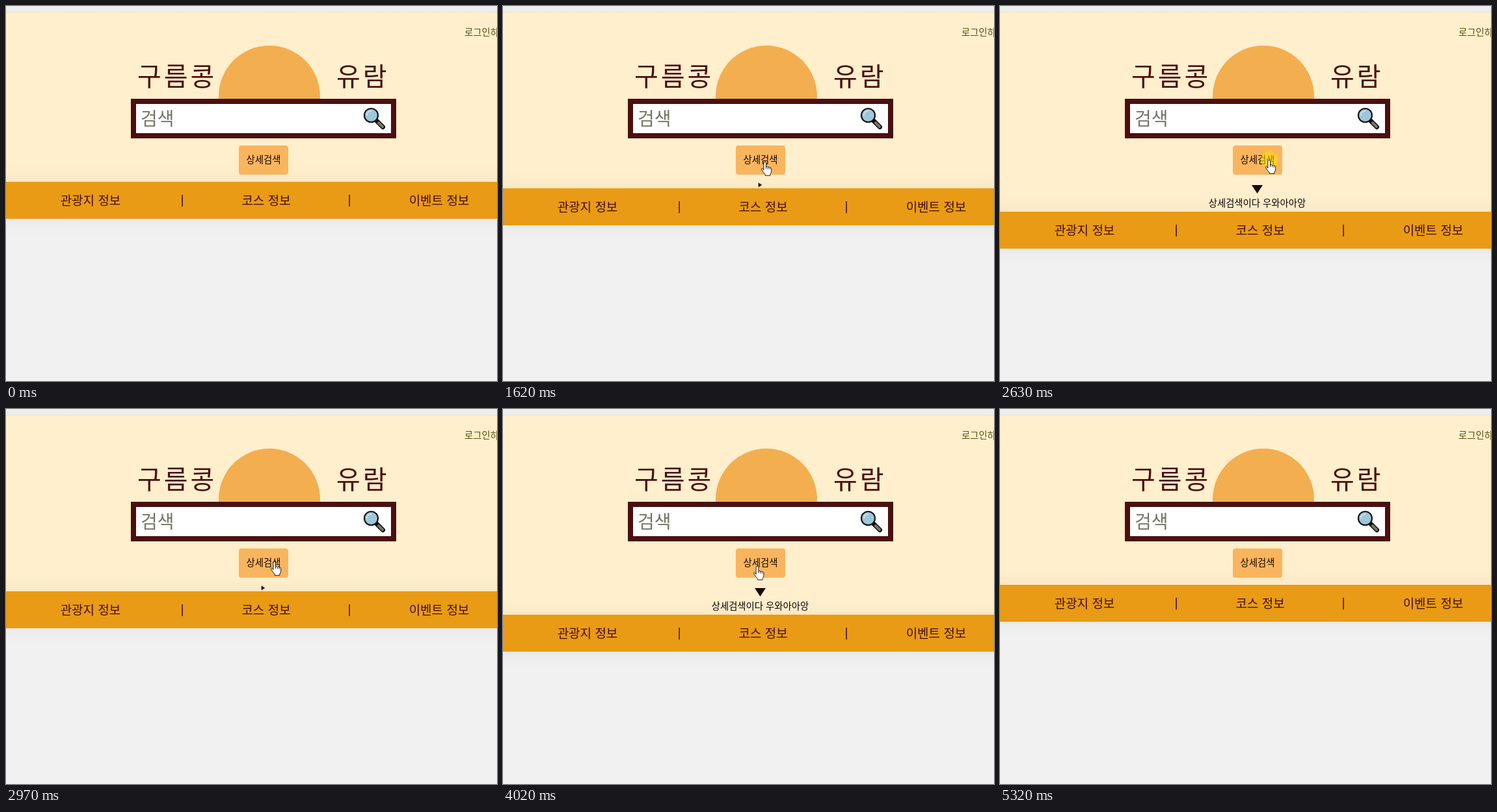
An HTML page for the animation above (5.59 s loop, 755 px wide and 578 px high).

```html
<!DOCTYPE html>
<html lang="ko">
<head>
<meta charset="utf-8">
<title>구름콩 유람</title>
<style>
  html, body { margin: 0; width: 100%; height: 100%; overflow: hidden; }
  body {
    position: relative; background: #f1f1f1; color: #100404;
    font: 14.4px/1 "Noto Sans CJK KR", "Noto Sans CJK", sans-serif;
  }
  body > * { position: absolute; }
  .strip { left: 0; right: 0; top: 0; height: 9px; background: linear-gradient(#efefef, #ededed); border-bottom: 1px solid #ebe4d3; }
  .header { left: 0; right: 0; top: 10px; height: 261px; background: #ffefcc; }
  .login { left: 705px; top: 33px; white-space: nowrap; color: #55500f; }
  .title { top: 86px; font-size: 40px; font-weight: 500; letter-spacing: 4px; color: #4c0f0f; white-space: nowrap; }
  .emblem { left: 327px; top: 61px; width: 156px; height: 82px; overflow: hidden; }
  .emblem::before { content: ""; display: block; height: 156px; border-radius: 50%; background: #f3ae4f; }
  .search {
    box-sizing: border-box; left: 192px; top: 143px; width: 408px; height: 61px;
    padding-left: 7px; border: 8px solid #4c0f0f; background: #fff;
    font-size: 28px; line-height: 42px; color: #757567;
  }
  .lens { left: 548px; top: 155px; }
  .button {
    left: 358px; top: 215px; width: 76px; height: 45px; z-index: 1;
    border-radius: 4px; background: #f9b55e; text-align: center; line-height: 42px;
  }

  /* The panel grows with the marker and the tip, and pushes the menu down. */
  .panel { left: 0; right: 0; top: 271px; }
  .marker, .tip { background: #ffefcc; text-align: center; overflow: hidden; }
  .marker { height: 0; animation: grow 5.59s ease infinite; }
  .marker svg { display: block; width: 23px; height: 100%; margin-left: 384px; animation: turn 5.59s ease infinite; }
  .tip { height: 0; line-height: 18px; padding-left: 36px; animation: tip 5.59s step-end infinite; }
  .menu {
    position: relative; height: 57px; margin: 0 -60px; background: #e99b15;
    box-shadow: 0 0 34px rgba(0, 0, 0, .055); font-size: 19px; color: #430d0d;
  }
  .menu span { position: absolute; top: 27px; transform: translate(-50%, -50%); white-space: nowrap; }
  .menu .bar { font-size: 16px; font-weight: 700; }

  .cursor { left: 0; top: 0; z-index: 2; width: 0; height: 0; animation: move 5.59s linear infinite; }
  .cursor > * { position: absolute; }
  .press {
    left: -13px; top: -13px; width: 26px; height: 26px; border-radius: 50%;
    background: rgba(255, 228, 0, .58); animation: press 5.59s step-end infinite;
  }
  .hand { left: -7px; top: -1px; animation: hand 5.59s step-end infinite; }
  .arrow { left: 0; top: 0; animation: arrow 5.59s step-end infinite; }

  @keyframes grow {
    0%, 11.807%, 32.558%, 37.925%, 56.708%, 66.726%, 87.478%, 100% { height: 0; }
    17.174%, 27.191%, 43.292%, 51.342%, 72.093%, 82.111% { height: 23px; }
  }
  @keyframes turn {
    0%, 11.807%, 37.925%, 66.726% { transform: rotate(316deg); }
    17.174%, 27.191%, 43.292%, 51.342%, 72.093%, 82.111% { transform: rotate(0deg); }
    32.558%, 56.708%, 87.478%, 100% { transform: rotate(-158deg); }
  }
  @keyframes tip {
    0%, 27.191%, 51.342%, 82.111%, 100% { height: 0; }
    11.807%, 37.925%, 66.726% { height: 23px; }
  }
  @keyframes press {
    0%, 11.807%, 27.191%, 37.925%, 51.342%, 66.726%, 82.111%, 100% { opacity: 0; }
    9.66%, 22.89%, 35.05%, 47.04%, 64.21%, 77.81% { opacity: 1; }
  }
  @keyframes hand {
    0%, 85.868%, 100% { opacity: 0; }
    9.302% { opacity: 1; }
  }
  @keyframes arrow {
    0%, 9.302%, 95.15%, 100% { opacity: 0; }
    1.25%, 85.868% { opacity: 1; }
  }
  @keyframes move {
    0%, 1.252% { transform: translate(529px, 373px); }
    4.472% { transform: translate(420px, 325px); }
    7.156% { transform: translate(318px, 270px); }
    9.302% { transform: translate(398px, 239px); }
    10.733%, 14.49% { transform: translate(406px, 236px); }
    18.068%, 32.558% { transform: translate(403px, 240px); }
    35.063% { transform: translate(411px, 238px); }
    43.292%, 47.048% { transform: translate(414px, 237px); }
    51.342%, 58.14% { transform: translate(413px, 235px); }
    60.823% { transform: translate(391px, 247px); }
    64.222%, 66.726% { transform: translate(400px, 239px); }
    72.093%, 83.9% { transform: translate(391px, 242px); }
    85.152% { transform: translate(393px, 246px); }
    86.404% { transform: translate(450px, 304px); }
    87.657% { transform: translate(557px, 392px); }
    93.918%, 100% { transform: translate(714px, 559px); }
  }
</style>
</head>
<body>
  <div class="strip"></div>
  <div class="header"></div>
  <div class="login">로그인하기</div>
  <div class="title" style="left:202px">구름콩</div>
  <div class="emblem"></div>
  <div class="title" style="left:508px">유람</div>
  <div class="search">검색</div>
  <svg class="lens" width="37" height="37" stroke-linecap="round">
    <path d="M22 22L31.500 31.500" stroke="#0c0c0c" stroke-width="7"/>
    <path d="M25 25L31 31" stroke="#727a66" stroke-width="4"/>
    <circle cx="13.500" cy="13.500" r="10.500" fill="#9fc6da" stroke="#161616" stroke-width="2.200"/>
    <path d="M7 13a7 7 0 0 1 6-6" fill="none" stroke="#c4dfea" stroke-width="2"/>
  </svg>
  <div class="button">상세검색</div>

  <div class="panel">
    <div class="marker"><svg viewBox="0 0 23 23"><path d="M3 5H20L11.5 18Z" fill="#1c0808"/></svg></div>
    <div class="tip">상세검색이다 우와아아앙</div>
    <div class="menu">
      <span style="left:190px">관광지 정보</span>
      <span class="bar" style="left:331px">|</span>
      <span style="left:460px">코스 정보</span>
      <span class="bar" style="left:588px">|</span>
      <span style="left:726px">이벤트 정보</span>
    </div>
  </div>

  <div class="cursor">
    <div class="press"></div>
    <svg class="hand" width="18" height="24" viewBox="0 0 20 26" fill="#fff" stroke="#000" stroke-linejoin="round">
      <path d="M5.5 15V3a2 2 0 0 1 4 0v6.5q2-1.2 3.2.6 2-1 3 .8 2.300-.6 2.800 1.600V17q0 3-2 5v2.500H8V22.500Q5 19.500 2 14.500 1 12.500 2.500 12 4 12 5.500 15Z"/>
      <path d="M9.500 9.500V13M12.700 10.500V13.500M15.700 11.500V14" fill="none"/>
    </svg>
    <svg class="arrow" width="13" height="20" fill="#fff" stroke="#000">
      <path d="M.5 .8V16.200L4 12.900 6.300 18.500 8.800 17.500 6.500 12H11.500Z"/>
    </svg>
  </div>
</body>
</html>
```
